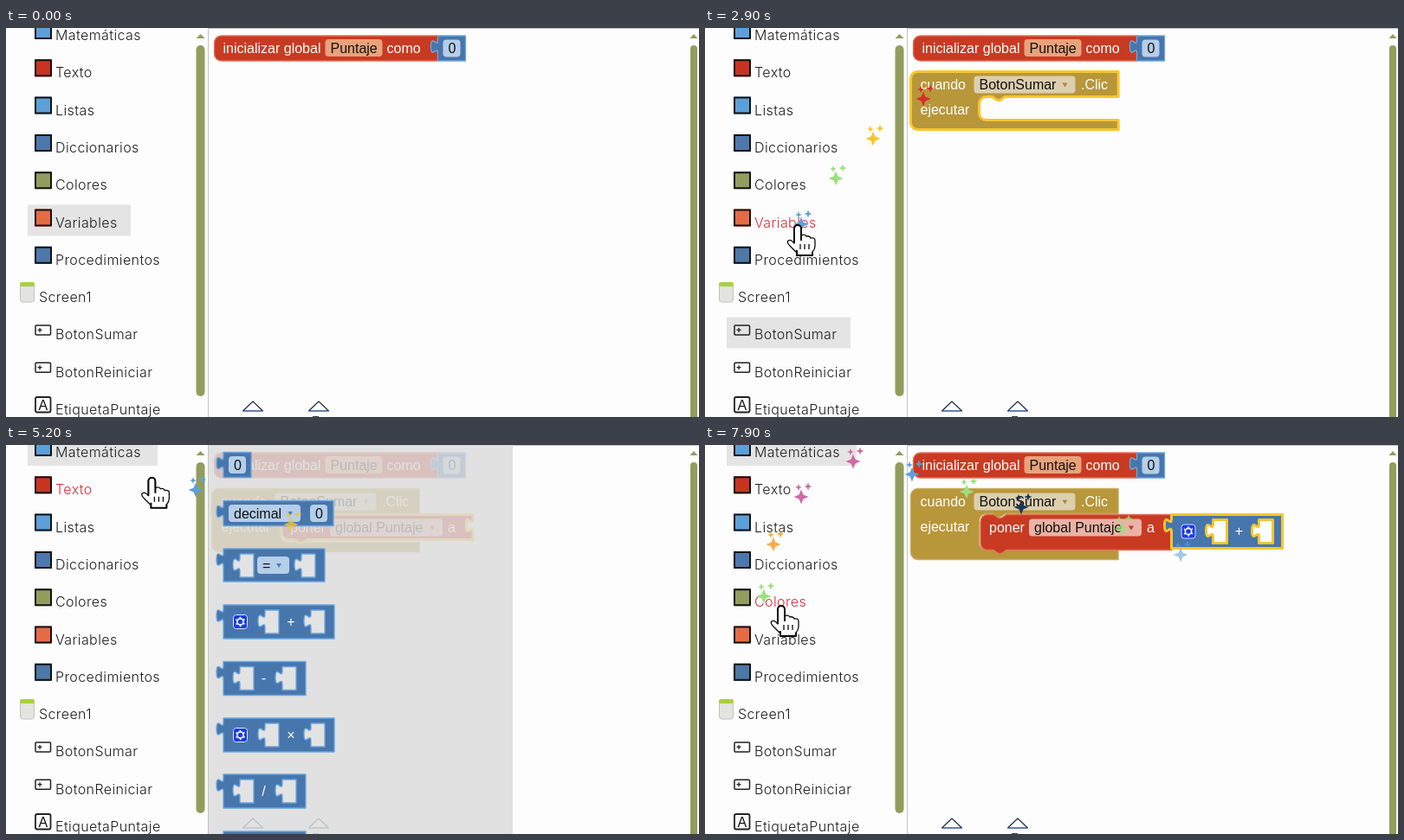
Recreate the animation shown at these times as an HTML page with a canvas. Size 800 px wide and 450 px high, loop 8 s.

```html
<!DOCTYPE html>
<html lang="es">
<head>
<meta charset="utf-8">
<title>Bloques</title>
<style>
html, body { margin: 0; width: 100%; height: 100%; overflow: hidden; background: #fdfdfd; }
canvas { display: block; width: 800px; height: 450px; }
</style>
</head>
<body>
<canvas id="stage" width="800" height="450"></canvas>
<script>
const ctx = document.getElementById('stage').getContext('2d');
const LOOP = 8000, SPARK_LIFE = 800;
const BLOCK_FONT = '16px "Liberation Sans", Arial, sans-serif';
const MENU_FONT = '300 16px Inter, "Open Sans", sans-serif';
const RED = '#c93a22', BLUE = '#4776ad', GOLD = '#b8963a', GREEN = '#929d5d', YELLOW = '#f7c52f';
const PEACH = '#e9a27c', PALE_RED = '#e9b3a5', PALE_BLUE = '#b5cee9', PALE_GOLD = '#dccfae';
const PAPER = '#fdfdfd', DRAWER = '#e3e3e3';
const SPARK = { r: '#d2302b', o: '#f2ae45', y: '#f8c62c', g: '#9be07f', p: '#d268a4', b: '#5f9edb', n: '#1d3557' };

// time, x, y, colour of the spark left behind
const PATH = [
  [250, 330, 450], [400, 260, 400, 'b'], [550, 190, 372, 'p'], [700, 110, 355], [1000, 110, 350],
  [1100, 128, 282, 'r'], [1180, 176, 217, 'o'], [1260, 221, 155, 'y'], [1340, 268, 87, 'g'], [1420, 295, 35, 'p'],
  [1520, 320, 74], [1700, 320, 74], [2200, 306, 116], [2350, 306, 116],
  [2480, 253, 80, 'r'], [2600, 195, 126, 'y'], [2720, 152, 172, 'g'], [2840, 112, 225, 'b'], [2900, 107, 229], [3100, 107, 229],
  [3200, 190, 190, 'p'], [3450, 337, 120], [3550, 337, 120], [3950, 405, 97], [4250, 405, 97],
  [4450, 440, 126], [4560, 440, 126], [4650, 330, 90, 'y'], [4750, 220, 50, 'b'], [4880, 110, 12], [5050, 110, 12],
  [5350, 226, 65, 'p'], [5750, 297, 222], [6200, 297, 222], [6300, 281, 209], [6950, 517, 77], [7050, 517, 77], [7200, 568, 104],
  [7280, 550, 125, 'b'], [7350, 482, 95, 'g'], [7420, 366, 70, 'n'], [7490, 303, 52, 'g'], [7560, 240, 32, 'b'],
  [7630, 172, 17, 'p'], [7700, 112, 58, 'p'], [7770, 80, 113, 'o'], [7840, 69, 173, 'g'], [7900, 88, 187]
];

const MENU = [
  ['Matemáticas', '#5c9fd9', 150], ['Texto', '#c93421'], ['Listas', '#5c9fd9'], ['Diccionarios', '#4d78ae'],
  ['Colores', GREEN], ['Variables', '#e56b45', 119], ['Procedimientos', '#4d78a8'], ['Screen1', 'screen'],
  ['BotonSumar', 'button', 143], ['BotonReiniciar', 'button'], ['EtiquetaPuntaje', 'label']
];
const rowY = i => 8 + i * 43.3;

function text(s, x, mid, color = '#fff', align = 'left') {
  ctx.font = BLOCK_FONT;
  ctx.fillStyle = color;
  ctx.textAlign = align;
  ctx.fillText(s, x, mid + 5.5);
}
function fill(color, x, y, w, h, r = 0) {
  ctx.fillStyle = color;
  ctx.beginPath();
  ctx.roundRect(x, y, w, h, r);
  ctx.fill();
}
function outline(color, width, x, y, w, h, r = 0) {
  ctx.strokeStyle = color;
  ctx.lineWidth = width;
  ctx.beginPath();
  ctx.roundRect(x, y, w, h, r);
  ctx.stroke();
}
function poly(points, color, stroke, width = 1) {
  ctx.beginPath();
  points.forEach(([x, y]) => ctx.lineTo(x, y));
  ctx.closePath();
  if (color) { ctx.fillStyle = color; ctx.fill(); }
  if (stroke) { ctx.strokeStyle = stroke; ctx.lineWidth = width; ctx.lineJoin = 'round'; ctx.stroke(); }
}
function at(x, y, draw) {
  ctx.save();
  ctx.translate(x, y);
  draw();
  ctx.restore();
}

// Block outlines
const SOCKET = 'v5 c0,10 -8,-8 -8,7.5 s8,-2.5 8,7.5';
const NOTCH = 'l-6,4 -3,0 -6,-4';
const valuePath = (w, h) => `M0,0 H${w} V${h} H0 V20 c0,-10 -8,8 -8,-7.5 s8,2.5 8,-7.5 z`;
const setterPath = (w, h) => `M0,8 A8,8 0 0 1 8,0 H15 l6,4 3,0 6,-4 H${w} ${SOCKET} V${h} H30 ${NOTCH} H8 a8,8 0 0 1 -8,-8 z`;
const globalPath = w => `M0,8 A8,8 0 0 1 8,0 H${w} ${SOCKET} V29 H8 a8,8 0 0 1 -8,-8 z`;
const cPath = (w, inner, slot) => `M0,8 A8,8 0 0 1 8,0 H${w} V29 H${inner + 30} ${NOTCH} h-7 a8,8 0 0 0 -8,8 ` +
  `v${slot - 16} a8,8 0 0 0 8,8 H${w} v11 H8 a8,8 0 0 1 -8,-8 z`;

function shape(d, color, edge, on) {
  const p = new Path2D(d);
  ctx.fillStyle = color;
  ctx.fill(p);
  ctx.strokeStyle = on ? YELLOW : edge;
  ctx.lineWidth = on ? 3 : 1.3;
  ctx.lineJoin = 'round';
  ctx.stroke(p);
}
function field(s, x, w, mid, color, arrow) {
  fill(color, x, mid - 10, w, 20, 4);
  text(s, x + 6, mid, '#111');
  if (arrow) poly([[x + w - 15, mid - 2], [x + w - 9, mid - 2], [x + w - 12, mid + 3]], arrow);
}
function hole(x, color, on) {
  at(x + 7, 6, () => shape(valuePath(16, 27), color, '#6aa5de', on));
}
function gear(x, y) {
  fill('#1b3de0', x, y, 17, 17, 3);
  outline('#dfe8ff', 1, x + .5, y + .5, 16, 16, 3);
  at(x + 8.5, y + 8.5, () => {
    ctx.strokeStyle = '#fff';
    ctx.lineWidth = 1.6;
    ctx.beginPath();
    ctx.arc(0, 0, 3.6, 0, 7);
    for (let i = 0; i < 6; i++) {
      const a = i * Math.PI / 3 + .5, c = Math.cos(a), s = Math.sin(a);
      ctx.moveTo(c * 4, s * 4);
      ctx.lineTo(c * 5.8, s * 5.8);
    }
    ctx.stroke();
  });
}

// Blocks
function number(x, y) {
  at(x, y, () => {
    shape(valuePath(32, 29), BLUE, '#6aa5de');
    field('0', 6, 20, 14.5, PALE_BLUE);
  });
}
function globalVar(x, y, name, fieldW) {
  const w = 192 + fieldW;
  at(x, y, () => {
    shape(globalPath(w), RED, '#e0705a');
    text('inicializar global', 10, 14);
    field(name, 128, fieldW, 14, PEACH);
    text('como', 133 + fieldW, 14);
  });
  return w;
}
function event(x, y, name, slot = 27, on = false) {
  at(x, y, () => {
    ctx.font = BLOCK_FONT;
    shape(cPath(208.5 + ctx.measureText(name).width, 79, slot), GOLD, '#c9ad62', on);
    text('cuando', 11, 15);
    field('BotonSumar', 73, 117, 15, PALE_GOLD, '#a98a3c');
    text(name, 196.5, 15);
    text('ejecutar', 11, 43.5);
  });
}
function setter(x, y, { chosen = false, h = 29, on = false, warn = false }) {
  at(x, y, () => {
    const left = warn ? 39 : 10;
    const fw = chosen ? 130 : 33, fx = left + 46;
    shape(setterPath(chosen ? 221 : left + 114, h), RED, '#e0705a', on);
    if (warn) {
      ctx.beginPath();
      ctx.arc(18, 14.5, 9, 0, 7);
      ctx.strokeStyle = '#2a1210';
      ctx.lineWidth = 1.8;
      ctx.stroke();
      ctx.beginPath();
      ctx.moveTo(13, 9.5); ctx.lineTo(23, 19.5);
      ctx.moveTo(23, 9.5); ctx.lineTo(13, 19.5);
      ctx.strokeStyle = '#f6dcd6';
      ctx.stroke();
    }
    text('poner', left, 15);
    field(chosen ? 'global Puntaje' : '', fx, fw, 15, PALE_RED, RED);
    text('a', fx + fw + 6, 15);
  });
}
function operator(x, y, sign, { geared = false, bg = DRAWER, on = false, color = BLUE }) {
  at(x, y, () => {
    const d = geared ? 0 : -29;
    shape(valuePath(geared ? 128 : 95, 39), color, '#6aa5de', on);
    if (geared) gear(11, 11);
    hole(41 + d, bg, on);
    text(sign, geared ? 78 : 46.5, 19, '#fff', 'center');
    hole(geared ? 94 : 61, bg, on);
  });
}

// Drawers
function drawer(w) {
  fill('rgba(221,221,221,.83)', 234, 0, w, 450);
}
function eventDrawer(t) {
  drawer(556);
  ['.Clic', '.ObtenerFoco', '.ClicLargo', '.PerderFoco', '.Presionar']
    .forEach((name, i) => event(251, 8.5 + i * 92.5, name, 27, !i && t > 1500));
}
function variableDrawer() {
  drawer(330);
  globalVar(251, 10, 'nombre', 66);
  at(251, 57, () => {
    shape(valuePath(103, 29), RED, '#e0705a');
    text('tomar', 10, 14.5);
    field('', 59, 33, 14.5, PALE_RED, RED);
  });
  setter(250, 103, {});
  [155, 248].forEach(y => at(251, y, () => {
    shape(cPath(246, 36, 27), RED, '#e0705a');
    text('inicializar local', 10, 14.5);
    field('nombre', 120, 66, 14.5, PEACH);
    text('como', 192, 14.5);
    text('en', 10, 43.5);
  }));
}
function mathDrawer() {
  drawer(351);
  number(251, 8.5);
  at(251, 64.5, () => {
    shape(valuePath(127, 29), BLUE, '#6aa5de');
    field('decimal', 6, 83, 14.5, PALE_BLUE, '#4f7fb8');
    field('0', 100, 20, 14.5, PALE_BLUE);
  });
  at(251, 120, () => {
    shape(valuePath(117, 38), BLUE, '#6aa5de');
    hole(12, DRAWER);
    field('=', 39, 37, 19, PALE_BLUE, '#4f7fb8');
    hole(83, DRAWER);
  });
  operator(251, 185, '+', { geared: true });
  operator(251, 250.5, '-', {});
  operator(251, 316, '×', { geared: true });
  operator(251, 381, '/', {});
  operator(251, 447, '^', {});
}

// Side panel
function icon(kind, mid) {
  if (kind === 'screen') {
    fill('#e3e3df', 16.5, mid - 16, 16, 22, 3);
    outline('#c4c4bf', 1, 16.5, mid - 16, 16, 22, 3);
    fill('#a9cf3f', 16, mid - 17, 17, 5, 2);
  } else if (kind === 'button') {
    outline('#222', 1.5, 34, mid - 10.5, 17.5, 11, 1);
    fill('#222', 36.5, mid - 5.7, 5, 1.3);
    fill('#222', 38.4, mid - 7.5, 1.3, 5);
  } else if (kind === 'label') {
    outline('#222', 1.8, 34, mid - 14, 17.5, 17.5, 2);
    text('A', 42.8, mid - 5, '#111', 'center');
  } else {
    fill(kind, 33, mid - 15, 20, 20);
    outline('#111', 2, 34, mid - 14, 18, 18);
  }
}
function panel(selected, hovered) {
  MENU.forEach(([name, kind, w], i) => {
    const mid = rowY(i);
    if (i === selected) fill('#e4e4e4', 25, mid - 20, w, 36);
    icon(kind, mid);
    ctx.font = MENU_FONT;
    ctx.letterSpacing = '0.4px';
    ctx.textAlign = 'left';
    ctx.fillStyle = i === hovered ? '#d5303a' : '#1e1e1e';
    ctx.fillText(name, kind === 'screen' ? 38 : 57, mid + 6);
    ctx.letterSpacing = '0px';
  });
  fill(GREEN, 219.5, 20, 10, 406, 5);
  poly([[219.5, 12], [229.5, 12], [224.5, 7]], GREEN);
  fill('#c4c4c4', 233, 0, 1, 450);
}
function workspaceFrame() {
  fill('#c4c4c4', 233, 0, 567, 1);
  for (const x of [285, 361]) {
    poly([[x, 432], [x - 11.5, 443], [x + 11.5, 443]], '#fff', '#1c2340', 1.1);
    fill('#3d6fc0', x - 11, 442.5, 22, 1);
  }
  fill('#444', 354, 449, 7, 1);
}
function rightBar() {
  fill(GREEN, 790, 20, 8, 440, 4);
  poly([[789.5, 12], [798.5, 12], [794, 7]], GREEN);
}

// Pointer
function pointerAt(t) {
  if (t < PATH[0][0]) return null;
  const i = PATH.findIndex(p => p[0] > t);
  if (i < 0) return PATH[PATH.length - 1].slice(1, 3);
  const [t0, x0, y0] = PATH[i - 1], [t1, x1, y1] = PATH[i];
  const k = (t - t0) / (t1 - t0);
  return [x0 + (x1 - x0) * k, y0 + (y1 - y0) * k];
}
function star(x, y, r) {
  const q = r * .28;
  poly([[x, y - r], [x + q, y - q], [x + r, y], [x + q, y + q], [x, y + r], [x - q, y + q], [x - r, y], [x - q, y - q]], ctx.fillStyle);
}
function sparks(t) {
  for (const [t0, x, y, c] of PATH) {
    const age = (t - t0) / SPARK_LIFE;
    if (!c || age < 0 || age > 1) continue;
    ctx.globalAlpha = Math.min(1, (1 - age) * 2.5);
    ctx.fillStyle = SPARK[c];
    star(x - 1, y + 2, 8.5);
    star(x - 4, y - 9, 4);
    star(x + 7, y - 10, 4.5);
  }
  ctx.globalAlpha = 1;
}
function pointer(x, y, hand) {
  at(x, y, () => {
    if (!hand) return poly([[0, 0], [28, 16], [15.5, 19], [10, 32]], '#fff', '#0a0a0a', 2.4);
    shape('M-4,3 a4,4 0 0 1 8,0 V11 q4,-2 6,1 q4,-1 5,2 q5,-1 5,3 V23 q0,4 -3,7 V34 H-1 V31 L-9,23 ' +
      'q-4,-4 -2,-6 q3,-2 7,3 z', '#fff', '#0a0a0a');
    ctx.strokeStyle = '#0a0a0a';
    ctx.lineWidth = 2;
    ctx.stroke(new Path2D('M-4,20 V3 a4,4 0 0 1 8,0 V17 M-1,28 V34 H17 V30'));
    ctx.lineWidth = 1.3;
    ctx.stroke(new Path2D('M3,21 v6 M8,21 v6 M13,21 v6'));
  });
}

const within = (t, a, b) => t >= a && t < b;

function render(t) {
  const pos = pointerAt(t);
  const held = (dx, dy) => [pos[0] - dx, pos[1] - dy];
  const selected = t < 900 ? 5 : t < 3050 ? 8 : t < 5000 ? 5 : 0;
  const hovered = pos && pos[0] < 185 ? MENU.findIndex((m, i) => Math.abs(pos[1] - rowY(i)) < 17) : -1;

  fill(PAPER, 0, 0, 800, 450);
  workspaceFrame();
  globalVar(240.5, 9, 'Puntaje', 66);
  number(498.5, 9);

  const joined = t >= 7200;
  if (t >= 1700) {
    const [x, y] = t < 2200 ? held(69, 66) : [237.5, 50.5];
    event(x, y, '.Clic', joined ? 42 : t >= 3950 ? 33 : 27, t < 3550);
  }
  if (t >= 3550) {
    const [x, y] = t < 3950 ? held(87, 17) : [318, 80.5];
    const chosen = t >= 4560;
    setter(x, y, { chosen, warn: !chosen, h: joined ? 41 : 29, on: t < 6300 });
  }
  if (within(t, 4300, 4560)) {
    fill('rgba(0,0,0,.18)', 405, 110, 150, 34, 3);
    fill('#fff', 403, 108, 150, 34, 3);
    fill('#e6e6e6', 404, 113, 148, 24);
    text('global Puntaje', 430, 125, '#111');
  }
  if (t >= 6300) {
    const [x, y] = joined ? [538.5, 80.5] : held(30, 24);
    operator(x, y, '+', { geared: true, bg: PAPER, on: true, color: joined ? BLUE : '#559cd5' });
  }

  if (within(t, 950, 1700)) eventDrawer(t);
  if (within(t, 3100, 3550)) variableDrawer();
  if (within(t, 5050, 6300)) mathDrawer();

  panel(selected, hovered);
  rightBar();
  sparks(t);
  if (pos) pointer(pos[0], pos[1], hovered >= 0);
}

const start = performance.now();
function tick() {
  render((performance.now() - start) % LOOP);
  requestAnimationFrame(tick);
}
tick();
</script>
</body>
</html>
```
